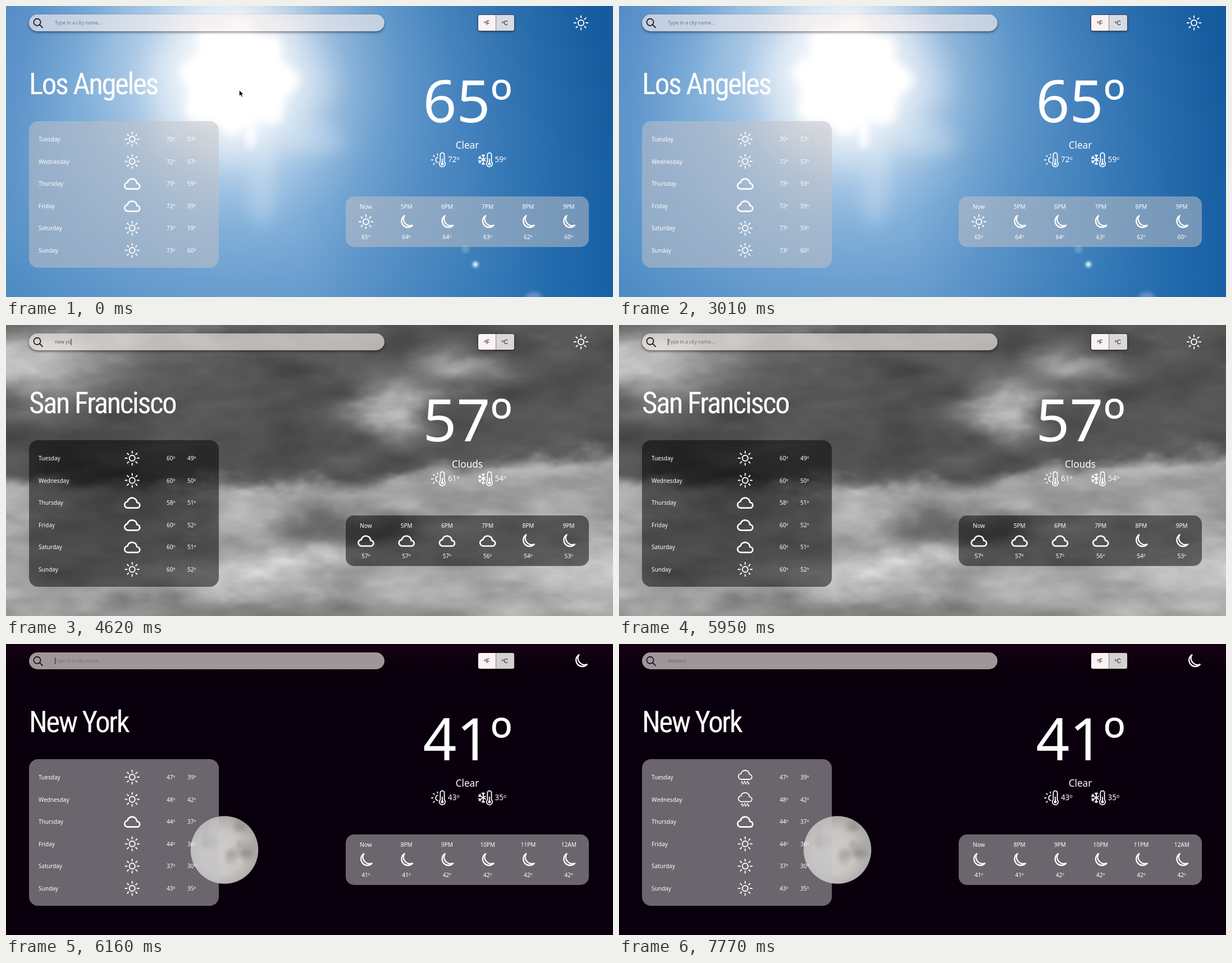
Write an HTML page with a canvas that moves like this. It is 1081 px wide and 518 px high and loops after 8000 ms.

```html
<!DOCTYPE html>
<html lang="en">
<head>
<meta charset="utf-8">
<title>Weather</title>
<style>
html, body { margin: 0; width: 100%; height: 100%; overflow: hidden; background: #fff; }
canvas, svg, div { position: absolute; left: 0; top: 0; }
#search { left: 41px; top: 15px; width: 633px; height: 30px; border-radius: 15px;
  background: rgba(250,240,239,.62); box-shadow: 0 2px 4px rgba(0,0,0,.5); }
#units { left: 841px; top: 16px; width: 64px; height: 28px; border-radius: 3px;
  background: linear-gradient(90deg, #fdf2f3 31px, #8a7f80 31px 32px, rgba(234,230,230,.9) 32px);
  box-shadow: 0 0 0 1px rgba(50,25,30,.45), 0 2px 4px rgba(0,0,0,.4); }
.panel { background: rgba(196,194,197,.52); }
.dark .panel { background: rgba(0,0,0,.5); }
#week { left: 41px; top: 205px; width: 338px; height: 261px; border-radius: 16px; }
#hours { left: 605px; top: 339px; width: 433px; height: 90px; border-radius: 15px; }
svg { font: 10.05px "Noto Sans", "Open Sans", sans-serif; fill: #fff; }
.line { fill: none; stroke: #fff; stroke-linecap: round; stroke-linejoin: round; }
.city { font: 53px "Roboto Condensed", Roboto, sans-serif; font-stretch: condensed; letter-spacing: -2.5px; }
.temp { font-size: 105px; }
.sum { font-size: 17.2px; }
.range { font-size: 13.5px; }
.unit { font: 10px "Liberation Sans", sans-serif; fill: #111; }
.mid { text-anchor: middle; }
#query { font-size: 8.57px; white-space: pre; }
</style>
</head>
<body>
<canvas id="sky" width="1081" height="518"></canvas>
<div id="search"></div>
<div id="units"></div>
<div id="week" class="panel"></div>
<div id="hours" class="panel"></div>
<svg width="1081" height="518">
  <g id="report"></g>
  <g fill="none" stroke="#111" stroke-width="1.7" stroke-linecap="round">
    <circle cx="55.5" cy="28.8" r="6.1"/><path d="M60 33.3l5 5"/>
  </g>
  <text class="unit mid" x="856.5" y="33.5">ºF</text>
  <text class="unit mid" x="888.5" y="33.5">ºC</text>
  <text id="query" x="87" y="33.2"></text>
  <rect id="caret" y="24" width="1" height="12" fill="#222"/>
  <path id="pointer" d="M0 0v10.2l2.4-2.2 1.7 3.7 1.7-.8-1.6-3.6h3.2z" fill="#000" stroke="#fff" stroke-width=".6"/>
</svg>
<script>
const W = 1081, H = 518, LOOP = 8000;
const $ = id => document.getElementById(id);
const mix = (a, b, k) => a + (b - a) * k;
const smooth = (a, b, v) => {
  const k = Math.max(0, Math.min(1, (v - a) / (b - a)));
  return k * k * (3 - 2 * k);
};

// ---------- noise ----------
const hash = (x, y) => { const n = Math.sin(x * 127.1 + y * 311.7) * 43758.5453; return n - Math.floor(n); };

function noise(x, y) {
  const i = Math.floor(x), j = Math.floor(y), u = smooth(0, 1, x - i), v = smooth(0, 1, y - j);
  return mix(mix(hash(i, j), hash(i + 1, j), u), mix(hash(i, j + 1), hash(i + 1, j + 1), u), v);
}

function fbm(x, y) {
  let sum = 0;
  for (let k = 0, a = .53; k < 4; k++, a /= 2) { sum += a * noise(x, y); x = x * 2 + 3; y = y * 2 + 7; }
  return sum;
}

// ---------- skies ----------
function paint(draw) {
  const c = document.createElement('canvas');
  c.width = W; c.height = H;
  draw(c.getContext('2d'));
  return c;
}

function fill(g, style) {
  g.fillStyle = style;
  g.fillRect(0, 0, W, H);
}

function wash(g, gradient, colors) {
  colors.forEach((color, i) => gradient.addColorStop(i / (colors.length - 1), color));
  fill(g, gradient);
}

function blob(g, x, y, rx, ry, color, blur) {
  g.filter = `blur(${blur}px)`;
  g.fillStyle = color;
  g.beginPath();
  g.ellipse(x, y, rx, ry, 0, 0, 7);
  g.fill();
  g.filter = 'none';
}

// Ragged glow: a circle whose radius ripples with the angle
function flare(g, size, blur, color) {
  g.filter = `blur(${blur}px)`;
  g.fillStyle = color;
  g.beginPath();
  for (let a = 0; a < 6.28; a += .05) {
    const r = size * (1 + .1 * Math.cos(8 * a - .6) + .06 * Math.cos(3 * a - 1) + .06 * Math.sin(a));
    g.lineTo(412 + r * Math.cos(a), 122 + r * Math.sin(a));
  }
  g.fill();
  g.filter = 'none';
}

function sunny(g) {
  wash(g, g.createRadialGradient(415, 115, 0, 415, 115, 760),
    ['#fff', '#dfeaf5', '#a9c8e5', '#80afd9', '#6c9fd0', '#5c95c9', '#4c8bc3', '#3b80bc', '#2f78b8']);
  wash(g, g.createLinearGradient(480, 300, W, 120), ['rgba(0,80,155,0)', 'rgba(5,85,160,.3)', 'rgba(5,75,145,.7)']);
  wash(g, g.createLinearGradient(0, 0, 170, 90), ['rgba(60,120,190,.4)', 'rgba(60,120,190,0)']);
  flare(g, 150, 28, 'rgba(255,255,255,.4)');
  flare(g, 98, 8, '#fff');
  blob(g, 436, 225, 10, 30, '#fff', 7);
  blob(g, 456, 310, 22, 85, 'rgba(225,238,250,.35)', 16);
  blob(g, 555, 238, 48, 30, 'rgba(225,238,250,.32)', 16);
  blob(g, 836, 460, 5, 5, '#d9f5f7', 2);
  blob(g, 818, 433, 7, 7, 'rgba(140,195,215,.45)', 2);
  blob(g, 940, 520, 15, 11, 'rgba(150,160,215,.6)', 3);
}

// Light and dark masses over the cloud deck: x, y, half width, half height, gain
const masses = [
  [0, 70, 190, 65, 105], [300, 0, 260, 25, 40], [690, 155, 60, 45, 88], [810, 80, 110, 32, 62],
  [440, 330, 55, 55, 35], [550, 360, 105, 42, -62], [665, 365, 60, 28, -40], [450, 435, 140, 36, 48],
  [1010, 440, 140, 60, 28], [280, 515, 480, 28, -32], [200, 300, 150, 50, -30]
];

function cloudGrey(x, y) {
  const px = x + (fbm(x / 70, y / 40) - .5) * 85;
  const py = y + (fbm(x / 70 + 9, y / 40) - .5) * 55;
  const edge = 275 - 50 * smooth(650, 950, px);
  let v = mix(82, 166, smooth(edge - 15, edge + 25, py));
  for (const [cx, cy, rx, ry, gain] of masses)
    v += gain * Math.exp(-(((px - cx) / rx) ** 2) - ((py - cy) / ry) ** 2);
  return v + (fbm(x / 100 + 5, y / 40) - .5) * v / 2;
}

function cloudy(g) {
  const w = Math.ceil(W / 2), h = H / 2, small = document.createElement('canvas');
  small.width = w; small.height = h;
  const s = small.getContext('2d'), img = s.createImageData(w, h);
  for (let i = 0; i < w * h; i++) {
    const grey = cloudGrey(i % w * 2, Math.floor(i / w) * 2);
    img.data.set([grey, grey, grey, 255], i * 4);
  }
  s.putImageData(img, 0, 0);
  g.drawImage(small, 0, 0, w * 2, H);
}

function night(g) {
  fill(g, '#0a000d');
  wash(g, g.createLinearGradient(0, 0, 0, 50), ['rgba(40,4,28,.35)', 'rgba(40,4,28,0)']);
  g.beginPath();
  g.arc(389, 366.5, 60.3, 0, 7);
  g.clip();
  wash(g, g.createRadialGradient(382, 372, 0, 382, 372, 75), ['#cfcdca', '#c9c7c4', '#a3a19e']);
  for (let i = 0; i < 16; i++)
    blob(g, 345 + 90 * hash(i, 1), 320 + 70 * hash(i, 2), 5 + 9 * hash(i, 3), 5 + 9 * hash(i, 4), 'rgba(130,128,126,.22)', 3);
}

const skies = { sunny: paint(sunny), cloudy: paint(cloudy), blank: paint(g => fill(g, '#fff')), night: paint(night) };

// ---------- icons ----------
const range = (n, f) => Array.from({ length: n }, (_, i) => f(i)).join('');
const icon = (x, y, width, body, scale = 1) =>
  `<g class="line" stroke-width="${width}" transform="translate(${x} ${y}) scale(${scale})">${body}</g>`;
const sunShape = '<circle r="3.1"/>' + range(8, i => `<path d="M0 5.6v1.9" transform="rotate(${i * 45})"/>`);
const cloudShape = '<path d="M-4.2 5H4.7A2.8 2.75 0 0 0 4.7-.5C4.6-3.2 2.5-5 0-5A5 5 0 0 0-3.3-3.8C-4.1-3.1-4.55-2.2-4.6-1.35-6.3-1.1-7.5.2-7.5 1.8-7.5 3.5-6.1 5-4.2 5z"/>';
const drops = range(6, i => `<path d="M${-5.5 + i % 3 * 5 + (i > 2) * 2} ${i > 2 ? 10 : 7.5}l-1 2.3"/>`);
const icons = {
  s: (x, y) => icon(x, y, 1.2, sunShape, 1.63),
  m: (x, y) => icon(x, y, 1.55, '<path d="M-2.4-7.1A7.4 7.4 0 1 0 7 4.2 7.8 7.8 0 0 1-2.4-7.1z"/>', 1.53),
  c: (x, y) => icon(x, y + .5, 1.5, cloudShape, 1.8),
  r: (x, y) => icon(x, y - 4, 1.1, cloudShape, 1.6) + icon(x, y, 1.7, drops)
};
const thermometer = x => icon(x, 273.5, 1.8,
  '<path d="M-3.6 3.7V-8.6a3.6 3.6 0 0 1 7.2 0V3.7a5.2 5.2 0 1 1-7.2 0z"/><circle cy="7.6" r="1.6" fill="#fff"/><path d="M0 6V-1"/>');
const halfSun = icon(769, 274, 1.8, '<path d="M0-4.6A4.7 4.7 0 0 0 0 4.6M-8.5 0h-2.6M-6.2-6.2l-1.6-1.6M-6.2 6.2l-1.6 1.6M-.5-8.6v-2"/>');
const flake = icon(850, 273.5, 1.7, range(4, i =>
  `<path d="M0 0V-9M-2.4-8L0-5.6 2.4-8" transform="rotate(${180 + i * 60})"/>`) + '<path d="M0 0l4-2.5M0 0l4 2.5"/>');

// ---------- reports ----------
const days = ['Tuesday', 'Wednesday', 'Thursday', 'Friday', 'Saturday', 'Sunday'];
const la = { name: 'Los Angeles', now: 65, sum: 'Clear', hi: 72, lo: 59, theme: 's', week: 'ssccss', hour: 4, next: 'smmmmm',
  highs: [70, 72, 73, 72, 73, 73], lows: [57, 57, 59, 59, 59, 60], temps: [65, 64, 64, 63, 62, 60] };
const sf = { name: 'San Francisco', now: 57, sum: 'Clouds', hi: 61, lo: 54, theme: 's', week: 'sscccs', hour: 4, next: 'ccccmm',
  highs: [60, 60, 58, 60, 60, 60], lows: [49, 50, 51, 52, 51, 52], temps: [57, 57, 57, 56, 54, 53] };
const ny = { name: 'New York', now: 41, sum: 'Clear', hi: 43, lo: 35, theme: 'm', week: 'sscsss', hour: 7, next: 'mmmmmm',
  highs: [47, 48, 44, 44, 37, 43], lows: [39, 42, 37, 36, 30, 35], temps: [41, 41, 42, 42, 42, 42] };
const nyRain = { ...ny, week: 'rrcsss' };

const text = (x, y, str, cls = '') => `<text x="${x}" y="${y}" class="${cls}">${str}</text>`;

function report(c) {
  const week = range(6, i => {
    const y = 237 + i * 39.6;
    return text(58, y + 4, days[i]) + icons[c.week[i]](224.7, y) +
      text(286, y + 4, c.highs[i] + 'º') + text(323, y + 4, c.lows[i] + 'º');
  });
  const hours = range(6, i => {
    const x = 641 + i * 72.25, hour = c.hour + i;
    const label = i ? hour + (hour < 12 ? 'PM' : 'AM') : 'Now';
    return text(x, 361, label, 'mid') + icons[c.next[i]](x, 384) + text(x, 415, c.temps[i] + 'º', 'mid');
  });
  return text(41, 157, c.name, 'city') + text(742.5, 207, c.now + 'º', 'temp') + text(821.5, 254, c.sum, 'sum mid') +
    halfSun + thermometer(777) + text(787, 278, c.hi + 'º', 'range') +
    flake + thermometer(861) + text(870.5, 278, c.lo + 'º', 'range') +
    icons[c.theme](1024, 30) + week + hours;
}

// ---------- timeline ----------
const scenes = [
  { at: 0, city: la, sky: 'sunny' },
  { at: 3360, city: sf, sky: 'cloudy' },
  { at: 6090, city: ny, sky: 'blank' },
  { at: 6160, city: ny, sky: 'night' },
  { at: 6230, city: nyRain, sky: 'night' }
];
const searches = [
  { word: 'san francisco', at: 980, end: 2450, sent: 2660 },
  { word: 'new york', at: 3780, end: 4900, sent: 5390 },
  { word: 'monaco', at: 6230, end: 7210, sent: LOOP }
];
const latest = (list, t) => list.filter(e => e.at <= t).pop();
const sky = $('sky').getContext('2d');
let scene;

function showScene(next) {
  scene = next;
  sky.drawImage(skies[scene.sky], 0, 0);
  document.body.className = scene.city === sf ? 'dark' : '';
  $('report').innerHTML = report(scene.city);
}

function showSearch(t) {
  const s = latest(searches, t), query = $('query');
  let typed = '', caret = false;
  if (s) {
    const progress = Math.min(1, (t - s.at) / (s.end - s.at));
    if (t < s.sent) typed = s.word.slice(0, 1 + Math.floor(progress * (s.word.length - 1)));
    caret = Math.floor((t - s.end - 560) / 490) % 2 !== 0 || t < s.end;
  }
  const shown = typed || 'Type in a city name...';
  if (query.textContent !== shown) {
    query.textContent = shown;
    query.style.fill = typed ? '#665f63' : '#757575';
    $('caret').setAttribute('x', typed ? 87 + query.getComputedTextLength() : 87);
  }
  $('caret').style.display = caret ? '' : 'none';
}

function frame() {
  const t = performance.now() % LOOP, next = latest(scenes, t);
  if (next !== scene) showScene(next);
  showSearch(t);
  const p = smooth(0, 700, t);
  $('pointer').setAttribute('transform', `translate(${mix(415.5, 828, p)} ${mix(150, 238.5, p)})`);
  $('pointer').style.display = t < 980 ? '' : 'none';
  requestAnimationFrame(frame);
}
frame();
</script>
</body>
</html>
```
